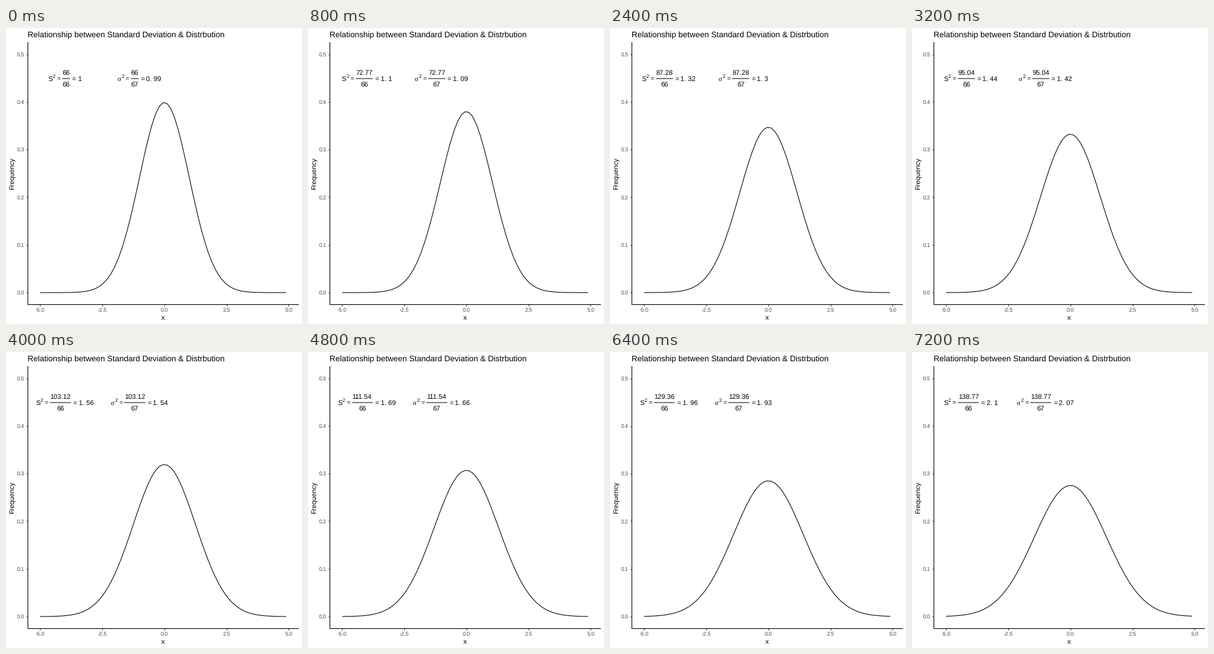
Animation, 480 px wide and 480 px high, one loop 8000 ms. Source, as a matplotlib script:

```python
import numpy as np
import matplotlib as mpl
import matplotlib.pyplot as plt
from matplotlib.animation import FuncAnimation

mpl.rcParams["font.family"] = "Liberation Sans"
mpl.rcParams["text.hinting"] = "none"

SIZE, DPI = 480, 100
PT = 72 / DPI                     # one pixel in points
LEFT, RIGHT, TOP, BOTTOM = 35.4, 474.3, 23.3, 448.4
LINE = 1.07
EM = 11.04                        # formula font size in pixels
THICK = 5 / 18 * EM               # space around a relation sign

TOTALS = [66, 72.77, 79.86, 87.28, 95.04, 103.12, 111.54, 120.29, 129.36, 138.77]
XS = np.arange(67) * 0.15 - 5


def px(x):
    return LEFT + (x + 5.495) * (RIGHT - LEFT) / 10.89


def py(y):
    return BOTTOM - (y + 0.025) * (BOTTOM - TOP) / 0.55


fig = plt.figure(figsize=(SIZE / DPI, SIZE / DPI), dpi=DPI, facecolor="white")
ax = fig.add_axes([0, 0, 1, 1])
ax.set_xlim(0, SIZE)
ax.set_ylim(SIZE, 0)
ax.axis("off")


def text(x, y, s, size, color="black", ha="left", **kw):
    return ax.text(x, y, s, fontsize=size * PT, color=color, ha=ha,
                   va="baseline", **kw)


def line(x, y, color="black", width=LINE, cap="butt", **kw):
    return ax.plot(x, y, color=color, lw=width * PT, solid_capstyle=cap, **kw)[0]


def width(s):
    """Advance width of a number in pixels."""
    return EM * sum(0.278 if c in ". " else 0.556 for c in s)


def draw_axes():
    for v in np.arange(6) / 10:
        line([LEFT - 2.75, LEFT], [py(v)] * 2, "#333333")
        text(LEFT - 5.5, py(v) + 3.1, f"{v:.1f}", 8.8, "#4d4d4d", "right")
    for v in np.arange(-2, 3) * 2.5:
        line([px(v)] * 2, [BOTTOM, BOTTOM + 2.75], "#333333")
        text(px(v), 460, f"{v:.1f}", 8.8, "#4d4d4d", "center")
    line([LEFT, LEFT], [TOP, BOTTOM], cap="projecting")
    line([LEFT, RIGHT], [BOTTOM, BOTTOM], cap="projecting")
    text((LEFT + RIGHT) / 2, 473, "x", 11, ha="center")
    text(12.6, (TOP + BOTTOM) / 2, "Frequency", 11, ha="center",
         rotation=90, rotation_mode="anchor")
    text(LEFT, 15, "Relationship between Standard Deviation & Distrbution", 13.13)


class Formula:
    """symbol^2 = total / count = value, centred on a data position."""

    def __init__(self, x, symbol, em, count, font):
        self.mid, self.em, self.count = px(x) - 0.3, em * EM, count
        self.symbol = text(0, 86, symbol, EM, family=font)
        self.power = text(0, 81, "2", 0.7 * EM)
        self.eq1 = text(0, 86, "=", 10)
        self.num = text(0, 76, "", EM)
        self.bar = line([0, 0], [82, 82], width=1, snap=False)
        self.den = text(0, 95, str(count), EM)
        self.eq2 = text(0, 86, "=", EM)
        self.value = text(0, 86, "", EM)

    def update(self, total):
        num = f"{total:g}" if total < 100 else f"{total:.2f}"
        value = f"{round(total / self.count, 2):g}".replace(".", ". ")
        eq = 0.549 * EM
        power = 0.31 * EM
        bar = width(num)
        full = self.em + power + 2 * (eq + 2 * THICK) + bar + width(value)
        x = self.mid - full / 2
        self.symbol.set_x(x)
        x += self.em
        self.power.set_x(x)
        x += power + THICK
        self.eq1.set_x(x)
        x += eq + THICK
        self.num.set_text(num)
        self.num.set_x(x)
        self.bar.set_xdata([x - 0.3, x + bar])
        self.den.set_x(x + (bar - width(str(self.count))) / 2)
        x += bar + THICK
        self.eq2.set_x(x)
        x += eq + THICK
        self.value.set_text(value)
        self.value.set_x(x)


draw_axes()
curve = line(px(XS), py(0 * XS))
formulas = [Formula(-4, "S", 0.667, 66, "Liberation Sans"),
            Formula(-1, "σ", 0.603, 67, "Liberation Serif")]


def update(i):
    sd = 1 + 0.05 * i
    density = np.exp(-0.5 * (XS / sd) ** 2) / (sd * np.sqrt(2 * np.pi))
    curve.set_ydata(py(density))
    for formula in formulas:
        formula.update(TOTALS[i])
    return []


anim = FuncAnimation(fig, update, frames=len(TOTALS), interval=800,
                     repeat=True, repeat_delay=0, blit=False)
plt.show()
```
